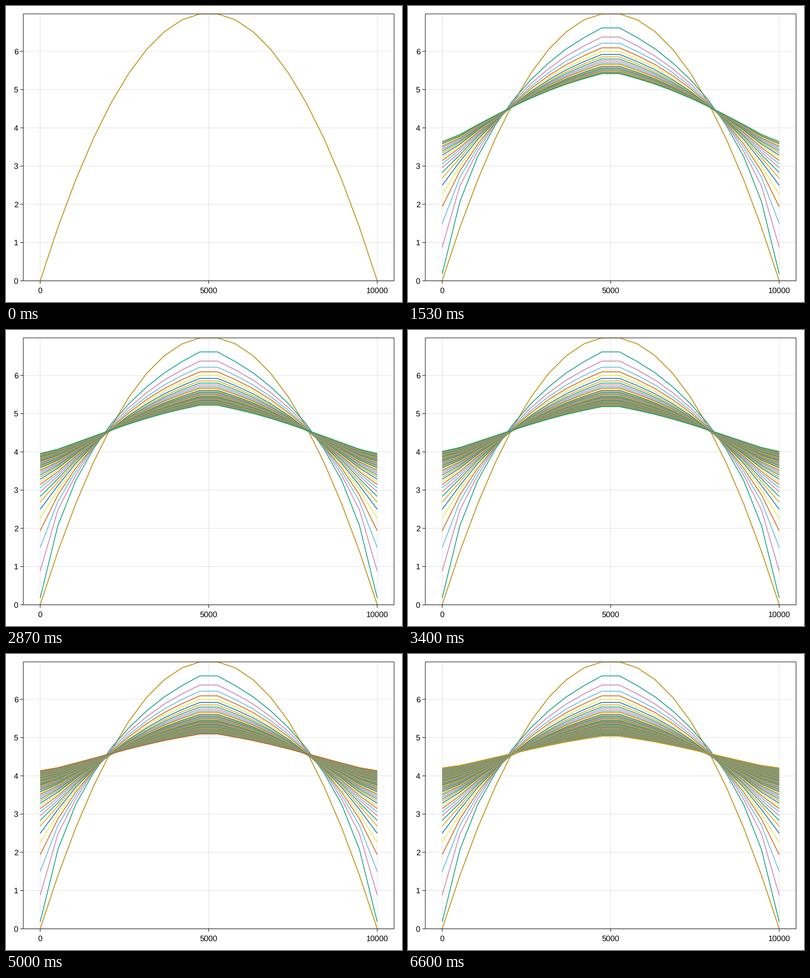
A matplotlib script for the animation above (6.67 s loop, 800x600 px).

```python
import matplotlib.pyplot as plt
import numpy as np
from matplotlib.animation import FuncAnimation
from matplotlib.patches import Rectangle

plt.rcParams.update({
    "font.family": "Liberation Sans",
    "text.hinting": "none",
    "text.hinting_factor": 1,
    "toolbar": "None",
})

W, H, DPI = 800, 600, 100
PT = 72 / DPI                                   # points per pixel
LEFT, RIGHT, TOP, BOTTOM = 35, 784, 16, 557
FRAMES, LOOP = 100, 6670
NODES, SUBSTEPS = 20, 100
COLORS = ["#0072B2", "#E69F00", "#009E73", "#CC79A7",
          "#56B4E9", "#D55E00", "#F0E442"]

# Glen's law ice sheet, n = 3
GAMMA = 2 / 5 * 1e-16 * (910 * 9.8) ** 3
DT = 8000 / (FRAMES - 1) / SUBSTEPS


def rate(h):
    """Thickness change of the sheet, no flow through the ends."""
    d = np.diff(h)
    slope = np.empty(NODES)
    slope[0], slope[-1] = d[0], d[-1]
    slope[1:-1] = (d[:-1] + d[1:]) / 2
    s2, h5 = slope ** 2, h ** 5
    flux = GAMMA * d * (s2[:-1] + s2[1:]) / 2 * (h5[:-1] + h5[1:]) / 2
    out = np.zeros(NODES)
    out[:-1] += flux
    out[1:] -= flux
    out[0] *= 2                                 # end cells are half as wide
    out[-1] *= 2
    return out


def solve(h):
    states = [h]
    for _ in range(FRAMES - 1):
        for _ in range(SUBSTEPS):
            h = h + DT * rate(h + DT / 2 * rate(h))
        states.append(h)
    return states


s = np.linspace(0, 1, NODES)
start = 28 * s * (1 - s)
profiles = [start] + solve(start)
peak = start.max()


def px(x):
    return LEFT + (RIGHT - LEFT) * (x + 500) / 11000


def py(y):
    return BOTTOM - (BOTTOM - TOP) * y / peak


fig = plt.figure(figsize=(W / DPI, H / DPI), dpi=DPI, facecolor="white")
ax = fig.add_axes([0, 0, 1, 1])
ax.set(xlim=(0, W), ylim=(H, 0))
ax.axis("off")


def stroke(xs, ys, color="black", width=1, z=5, **kw):
    line, = ax.plot(xs, ys, color=color, lw=width * PT, zorder=z, snap=False,
                    solid_capstyle="butt", solid_joinstyle="miter", **kw)
    return line


def label(x, y, text, ha):
    ax.text(x, y, text, ha=ha, va="baseline", fontsize=16 * PT, color="black")


for v in (0, 5000, 10000):
    x = px(v)
    stroke([x, x], [TOP, BOTTOM], alpha=0.12, z=1)
    stroke([x, x], [BOTTOM, BOTTOM + 6])
    label(x, 581.5, str(v), "center")

for v in range(7):
    y = py(v)
    stroke([LEFT, RIGHT], [y, y], alpha=0.12, z=1)
    stroke([LEFT - 6, LEFT], [y, y])
    label(24.6, y + 5.7, str(v), "right")

ax.add_patch(Rectangle((LEFT, TOP), RIGHT - LEFT, BOTTOM - TOP, fill=False,
                       ec="black", lw=PT, zorder=5, snap=False))

clip = Rectangle((LEFT, TOP), RIGHT - LEFT, BOTTOM - TOP,
                 transform=ax.transData)
curves = []
for i, h in enumerate(profiles):
    curve = stroke(px(s * 10000), py(h), COLORS[i % len(COLORS)], 1.5, z=2)
    curve.set_clip_path(clip)
    curves.append(curve)


def draw(frame):
    for i, curve in enumerate(curves):
        curve.set_visible(i <= frame + 1)
    return curves


anim = FuncAnimation(fig, draw, frames=FRAMES, init_func=lambda: draw(0),
                     interval=LOOP / FRAMES, repeat=True, repeat_delay=0)
plt.show()
```
